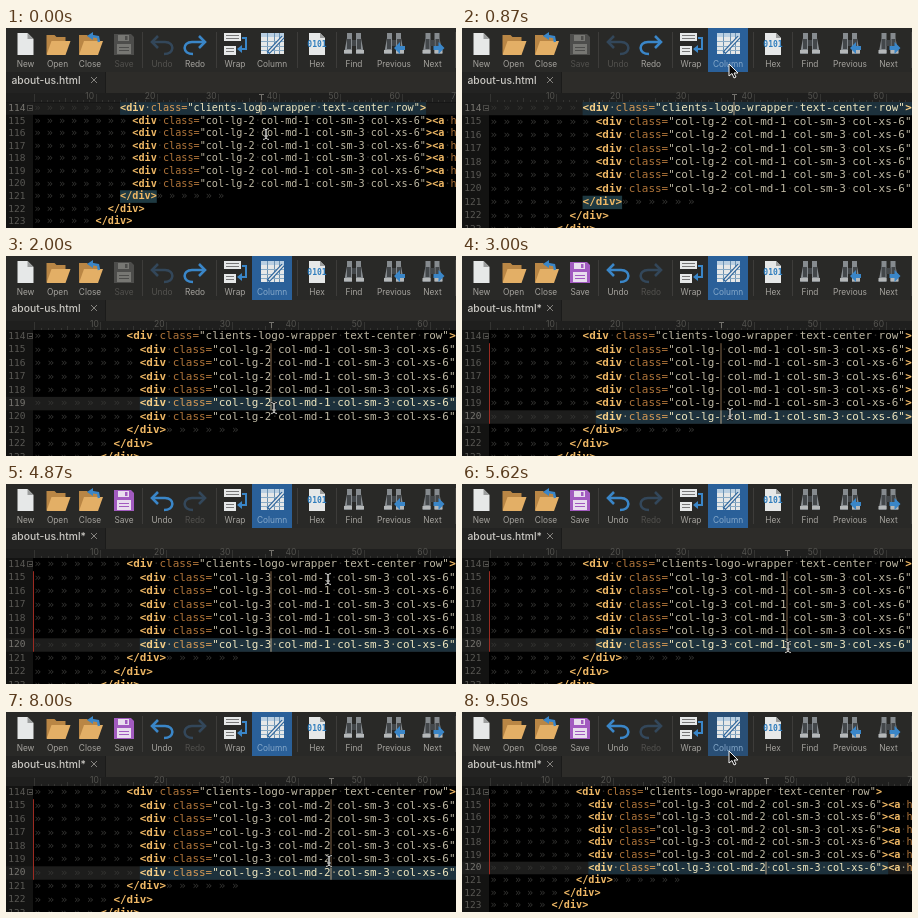
These frames come from a looping animation (450 px wide and 200 px high, 9620 ms). An HTML page with a canvas:

```html
<!DOCTYPE html>
<html lang="en">
<head>
<meta charset="utf-8">
<title>Column editing</title>
<style>
html, body { margin: 0; width: 100%; height: 100%; overflow: hidden; background: #000; }
canvas { display: block; width: 450px; height: 200px; }
</style>
</head>
<body>
<canvas id="stage" width="450" height="200"></canvas>
<script>
const ctx = document.getElementById('stage').getContext('2d');
const LOOP = 9620;
const MONO = '"DejaVu Sans Mono", monospace';
const UI = 'Inter, sans-serif';
const FIRST_LINE = 80.5;
const C = {
  bar: '#292927', line: '#1b1b1a', text: '#a5a39e', dim: '#52514e',
  tag: '#efb865', attr: '#b0753a', str: '#bdb7a3', mark: '#343432',
  tagNow: '#f6cf86', attrNow: '#d69a55', strNow: '#eee6bf',
  blue: '#3a86c8', dimBlue: '#33475a', white: '#e6e8e8', gold: '#e3af66'
};

// Moments, in ms, at which the document or editor state changes
const AT = {
  columnOn: 870, drag1: 1500, del1: 2700, type1: 3500,
  drag2: 5000, del2: 6400, type2: 7100, columnOff: 9250
};

// Pointer path: time, x, y
const PATH = [
  [0, 260, 106], [250, 260, 106], [720, 267, 36], [950, 267, 36],
  [1400, 268, 92], [1500, 268, 93], [1620, 268, 106], [2050, 268, 158],
  [4200, 268, 158], [4800, 322, 95], [5000, 322, 95], [5550, 326, 163],
  [7850, 326, 163], [8000, 323, 149], [8750, 267, 39], [LOOP, 267, 39]
];

function pointerAt(t) {
  const i = Math.max(1, PATH.findIndex(p => p[0] > t));
  const [t0, x0, y0] = PATH[i - 1], [t1, x1, y1] = PATH[i];
  const k = (t - t0) / (t1 - t0);
  return { x: x0 + (x1 - x0) * k, y: y0 + (y1 - y0) * k };
}

function stateAt(t) {
  const column = t >= AT.columnOn && t < AT.columnOff;
  const pointer = pointerAt(t);
  const rowUnder = time =>
    Math.min(6, Math.max(1, Math.round((pointerAt(time).y - FIRST_LINE) / 13.4)));
  let row = 0, col = 37;
  if (t >= AT.drag2) {
    row = rowUnder(Math.min(t, 5600));
    col = t >= AT.del2 && t < AT.type2 ? 44 : 45;
  } else if (t >= AT.drag1) {
    row = rowUnder(Math.min(t, 2100));
    col = t >= AT.del1 && t < AT.type1 ? 35 : 36;
  }
  return {
    column, pointer, row, col,
    changed: t >= AT.del1,
    large: t < AT.del1 ? '2' : t < AT.type1 ? '' : '3',
    medium: t < AT.del2 ? '1' : t < AT.type2 ? '' : '2',
    cell: column ? 6.585 : 6.12,
    pitch: column ? 13.42 : 12.58,
    left: 28.4
  };
}

function rect(x, y, w, h, color) {
  ctx.fillStyle = color;
  ctx.fillRect(x, y, w, h);
}

function poly(points, color) {
  ctx.fillStyle = color;
  ctx.beginPath();
  points.forEach(([x, y]) => ctx.lineTo(x, y));
  ctx.closePath();
  ctx.fill();
}

function stroke(points, color, width = 1) {
  ctx.strokeStyle = color;
  ctx.lineWidth = width;
  ctx.beginPath();
  points.forEach(([x, y]) => ctx.lineTo(x, y));
  ctx.stroke();
}

function label(text, x, y, color, font, align = 'left') {
  ctx.font = font;
  ctx.fillStyle = color;
  ctx.textAlign = align;
  ctx.textBaseline = 'middle';
  ctx.fillText(text, x, y);
}

// Toolbar icons are drawn around x = 0
const icon = {
  page() {
    poly([[-8, 5], [2, 5], [8, 11], [8, 27], [-8, 27]], C.white);
    poly([[2, 5], [2, 11], [8, 11]], '#9b9d9d');
  },
  folder() {
    poly([[-11, 7], [-3, 7], [-1, 9], [8, 9], [8, 26], [-11, 26]], '#b98645');
    poly([[-6, 13], [13, 13], [8, 27], [-11, 27]], C.gold);
  },
  close() {
    icon.folder();
    stroke([[9, 14], [8, 9], [2, 8]], C.blue, 2.5);
    poly([[-3, 8], [3, 4], [3, 12]], C.blue);
  },
  save(s) {
    const body = s.changed ? '#a25bc0' : '#4d4d4b';
    const paper = s.changed ? '#e9deee' : '#777773';
    poly([[-10, 6], [7, 6], [10, 9], [10, 27], [-10, 27]], body);
    rect(-6, 7, 11, 6, paper);
    rect(1, 8, 2.5, 4, body);
    rect(-7, 16, 14, 10, paper);
    [19, 22].forEach(y => rect(-5, y, 10, 1, body));
  },
  turn(color, side) {
    ctx.save();
    ctx.scale(side, 1);
    ctx.strokeStyle = color;
    ctx.lineWidth = 2.6;
    ctx.beginPath();
    ctx.moveTo(-9, 14);
    ctx.lineTo(3, 14);
    ctx.bezierCurveTo(13, 14, 13, 26, 2, 26);
    ctx.stroke();
    stroke([[-4, 8], [-10, 14], [-4, 20]], color, 2.6);
    ctx.restore();
  },
  wrap() {
    rect(-11, 5, 17, 8, C.white);
    [7, 10].forEach(y => rect(-9, y, 13, 1, '#777'));
    rect(-11, 18, 12, 9, C.white);
    [20, 23].forEach(y => rect(-9, y, 8, 1, '#777'));
    stroke([[7, 10], [11, 10], [11, 21], [7, 21]], C.blue, 2);
    poly([[2, 21], [7, 17], [7, 25]], C.blue);
  },
  column() {
    rect(-11, 5, 23, 21, C.white);
    rect(-11, 5, 23, 4, '#b9cfe2');
    [-5, 2, 7].forEach(x => rect(x, 5, 1, 21, '#6b91b1'));
    [13, 18, 22].forEach(y => rect(-11, y, 23, 1, '#8aabc5'));
    stroke([[-4, 25], [11, 9]], '#2d659c', 4);
    stroke([[-3, 24], [11, 9]], C.white, 1.6);
  },
  hex() {
    poly([[-8, 5], [3, 5], [8, 10], [8, 27], [-8, 27]], C.white);
    poly([[3, 5], [3, 10], [8, 10]], '#9b9d9d');
    label('0101', 0, 17, '#2f7dbd', 'bold 8px ' + MONO, 'center');
  },
  find() {
    const body = '#868b8f', dark = '#43474a';
    for (const side of [-1, 1]) {
      ctx.save();
      ctx.scale(side, 1);
      rect(2, 5, 5, 5, body);
      poly([[2, 10], [7, 10], [10, 26], [2, 26]], body);
      rect(3, 11, 4, 10, dark);
      rect(2, 22, 8, 3, '#b5b8b9');
      ctx.restore();
    }
    rect(-2, 12, 4, 6, dark);
  },
  search(side) {
    icon.find();
    ctx.save();
    ctx.translate(6, 0);
    ctx.scale(side, 1);
    poly([[6, 20], [0, 14], [0, 18], [-5, 18], [-5, 22], [0, 22], [0, 26]], C.blue);
    ctx.restore();
  }
};

const BUTTONS = [
  ['New', 19.5, icon.page], ['Open', 51.5, icon.folder],
  ['Close', 84, icon.close], ['Save', 118, icon.save, s => s.changed],
  ['Undo', 156, s => icon.turn(s.changed ? C.blue : C.dimBlue, 1), s => s.changed],
  ['Redo', 189, s => icon.turn(s.changed ? C.dimBlue : C.blue, -1), s => !s.changed],
  ['Wrap', 229, icon.wrap], ['Column', 266, icon.column],
  ['Hex', 311, icon.hex], ['Find', 348, icon.find],
  ['Previous', 388, () => icon.search(-1)], ['Next', 426.5, () => icon.search(1)]
];

function drawToolbar(s) {
  rect(0, 0, 450, 44, C.bar);
  const hover = s.pointer.y < 44 && Math.abs(s.pointer.x - 267) < 20;
  const lit = s.column || hover;
  if (lit) rect(246, 0, 40, 44, s.column ? '#2a6099' : '#294f76');
  [136, 210, 291, 330, 449].forEach(x => rect(x, 4, 1, 36, '#3d3c3a'));
  for (const [name, x, draw, enabled] of BUTTONS) {
    ctx.save();
    ctx.translate(x, 0);
    draw(s);
    ctx.restore();
    const color = name === 'Column' && lit ? '#86a9ca'
      : !enabled || enabled(s) ? C.text : C.dim;
    label(name, x, 37, color, '8.3px ' + UI, 'center');
  }
}

function drawTabs(s) {
  rect(0, 44, 450, 21, '#2d2c29');
  rect(0, 44, 99, 21, '#232322');
  rect(99, 44, 1, 21, C.line);
  label('about-us.html' + (s.changed ? '*' : ''), 5.5, 52.7, '#cbc9c4', '500 10.3px ' + UI);
  stroke([[85, 49], [91, 55]], '#85837f', 1);
  stroke([[91, 49], [85, 55]], '#85837f', 1);
}

function drawRuler(s) {
  rect(0, 65, 450, 9, '#1f1f1e');
  for (let col = 0; col < 72; col++) {
    const x = s.left + col * s.cell;
    const height = col % 10 ? col % 5 ? 2 : 4 : 8;
    rect(Math.round(x), 74 - height, 1, height, '#343432');
    if (col && col % 10 === 0) label(col, x - 1.5, 68.5, '#555450', '8.5px ' + UI, 'right');
  }
  const x = Math.round(s.left + s.col * s.cell);
  rect(x - 2, 66, 5, 1, '#74726d');
  rect(x, 66, 1, 6, '#74726d');
}

function codeFor(row, s) {
  if (row > 6) return [['</div>', 'tag']];
  const names = row === 0
    ? 'clients-logo-wrapper text-center row'
    : `col-lg-${s.large} col-md-${s.medium} col-sm-3 col-xs-6`;
  const parts = [['<div ', 'tag'], ['class=', 'attr'], [`"${names}"`, 'str'], ['>', 'tag']];
  if (row > 0) parts.push(['<a ', 'tag'], ['href=', 'attr'], ['"#"', 'str']);
  return parts;
}

function drawRow(row, s) {
  const y = FIRST_LINE + row * s.pitch, top = y - s.pitch / 2;
  const tabs = row === 0 ? 7 : row < 7 ? 8 : 14 - row;
  const start = s.left + tabs * 2 * s.cell;
  const current = row === s.row;
  const font = `${s.cell / .60205}px ${MONO}`;
  const parts = codeFor(row, s);

  if (current) {
    rect(0, top, 450, s.pitch, '#1d1d1c');
    const end = parts.slice(0, 4).reduce((n, p) => n + p[0].length, 0);
    rect(start, top, end * s.cell, s.pitch, '#1d313c');
  }
  if (row === 7 && s.row === 0) rect(start, top, 6 * s.cell, s.pitch, '#1f3a42');

  const arrow = x => label('»', x, y, C.mark, font);
  for (let i = 0; i < tabs; i++) arrow(s.left + i * 2 * s.cell);
  if (row === 7) for (let i = 0; i < 6; i++) arrow(start + (6 + i * 2) * s.cell);

  let x = start;
  for (const [text, kind] of parts) {
    const weight = kind === 'tag' ? 'bold ' : '';
    label(text, x, y, C[kind + (current ? 'Now' : '')], weight + font);
    [...text].forEach((ch, i) => {
      if (ch === ' ') label('·', x + i * s.cell, y, current ? '#a19d86' : '#2c2a26', font);
    });
    x += text.length * s.cell;
  }
  label(114 + row, 19.5, y, current ? '#787671' : '#5a5955', '9.5px ' + MONO, 'right');
}

function drawEditor(s) {
  rect(0, 74, 450, 126, '#000');
  rect(0, 74, 27, 126, '#131312');
  for (let row = 0; row < 10; row++) drawRow(row, s);

  ctx.strokeStyle = '#474643';
  ctx.lineWidth = 1;
  ctx.strokeRect(21.5, 77.5, 5, 5);
  rect(23, 80, 3, 1, '#5a5955');

  const topOf = row => FIRST_LINE + (row - .5) * s.pitch;
  if (s.changed) rect(27, topOf(1), 1, 6 * s.pitch, '#9c2b22');
  const first = s.column && s.row ? 1 : s.row;
  const x = Math.round(s.left + s.col * s.cell) - .5;
  rect(x, topOf(first), 1, (s.row - first) * s.pitch, '#82664a');
  rect(x, topOf(s.row), 1, s.pitch, '#b7a486');
}

function drawPointer({ x, y }) {
  ctx.save();
  ctx.translate(Math.round(x), Math.round(y));
  if (y < 73) {
    const arrow = [[0, 0], [0, 12], [3, 9.5], [5, 14], [7, 13], [5, 9], [9, 9]];
    poly(arrow, '#080808');
    stroke([...arrow, arrow[0]], '#f2f2f2', 1);
  } else {
    for (const [color, width] of [['#111', 2.4], ['#c9c9c6', 1]]) {
      stroke([[-3, -5.5], [-1, -5], [0, -4], [0, 4], [-1, 5], [-3, 5.5]], color, width);
      stroke([[3, -5.5], [1, -5], [0, -4], [0, 4], [1, 5], [3, 5.5]], color, width);
      stroke([[-2, 2], [2, 2]], color, width);
    }
  }
  ctx.restore();
}

function render(now) {
  const t = Math.floor((now % LOOP + 5) / 125) * 125;
  const s = stateAt(Math.min(t, LOOP - 1));
  drawEditor(s);
  drawTabs(s);
  drawRuler(s);
  drawToolbar(s);
  drawPointer(s.pointer);
}

const began = performance.now();
function tick() {
  render(performance.now() - began);
  requestAnimationFrame(tick);
}
tick();
</script>
</body>
</html>
```
